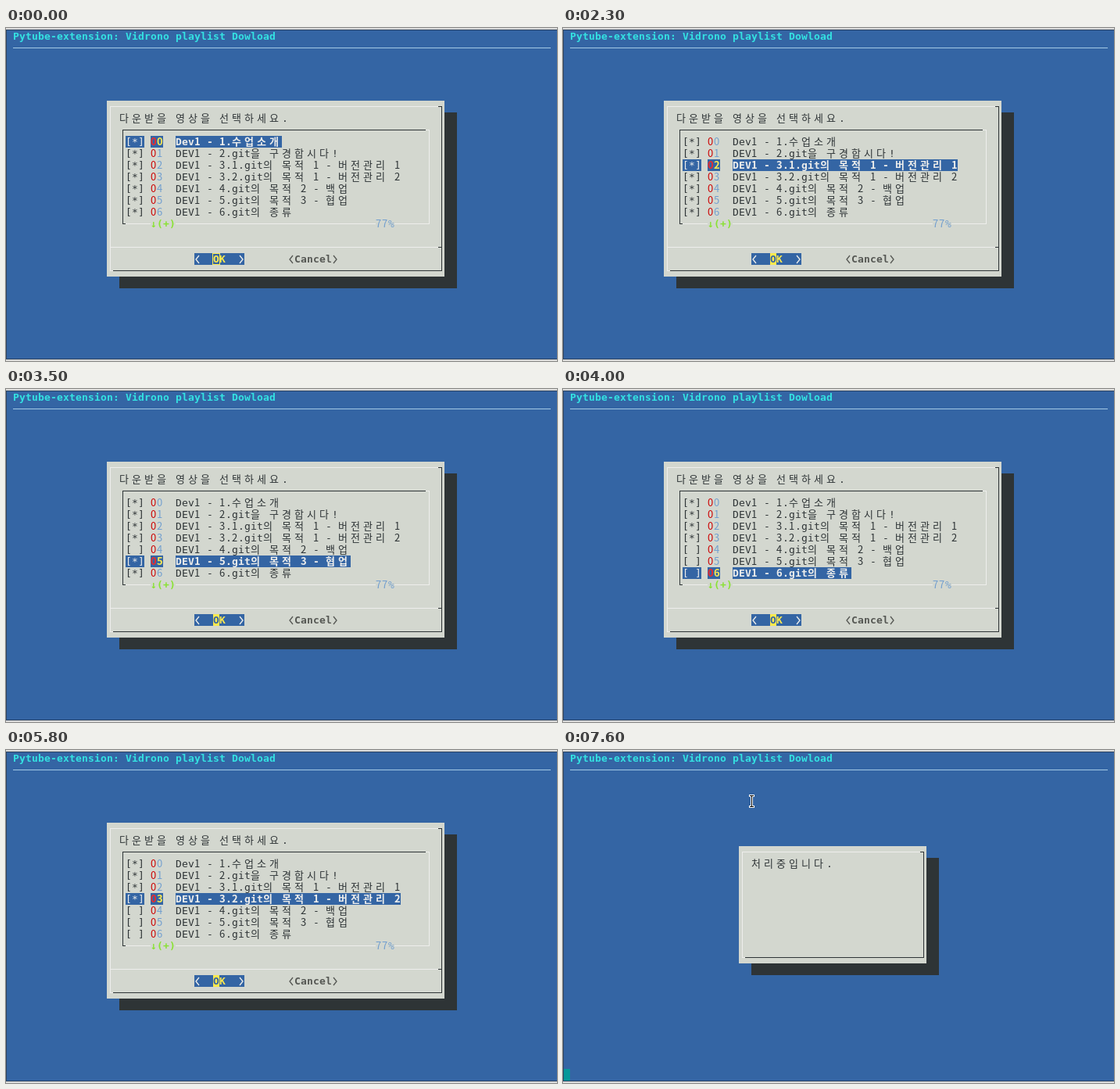
An HTML page with a canvas that plays this animation: 705x426 px, repeating every 8000 ms.

```html
<!DOCTYPE html>
<html lang="ko">
<head>
<meta charset="utf-8">
<title>Playlist dialog</title>
<style>
html, body { margin: 0; width: 100%; height: 100%; overflow: hidden; background: #3465a4; }
canvas { display: block; }
</style>
</head>
<body>
<canvas id="stage" width="705" height="426"></canvas>
<script>
const ctx = document.getElementById('stage').getContext('2d');
const LOOP = 8000, CW = 8, CH = 15;
const C = {
  blue: '#3465a4', dark: '#2e3436', grey: '#d3d7cf', light: '#eeeeec', cyan: '#34e2e2',
  yellow: '#fce94f', red: '#cc0000', brightRed: '#ef2929', sky: '#729fcf',
  green: '#8ae234', teal: '#06989a', dim: '#555753'
};
const LATIN = '"DejaVu Sans Mono", monospace';
const CJK = '"Noto Sans CJK KR", "Noto Sans CJK", sans-serif';

const items = [
  'Dev1 - 1.수업소개',
  'DEV1 - 2.git을 구경합시다!',
  'DEV1 - 3.1.git의 목적 1 - 버전관리 1',
  'DEV1 - 3.2.git의 목적 1 - 버전관리 2',
  'DEV1 - 4.git의 목적 2 - 백업',
  'DEV1 - 5.git의 목적 3 - 협업',
  'DEV1 - 6.git의 종류'
];

// Step tables: [time, value]
const selection = [[0, 0], [2100, 1], [2300, 2], [2800, 3], [3000, 4], [3500, 5],
  [3900, 6], [5500, 5], [5700, 4], [5800, 3]];
const unchecked = { 4: 3300, 5: 3700, 6: 4000 };
const caret = [[0, 'hollow'], [1100, 'block'], [1600, 'off'], [2100, 'block'],
  [4500, 'off'], [5200, 'block'], [7000, 'off'], [7600, 'block']];
const pointer = [[0, null], [500, [136, 0]], [600, [220, 51]], [1100, [238, 62]], [2100, null]];

const at = (steps, t) => steps.reduce((value, step) => t >= step[0] ? step[1] : value, null);
const px = col => 1 + col * CW;
const py = row => 3 + row * CH;
const isWide = ch => ch >= '가' && ch <= '힣';
const cells = text => [...text].reduce((n, ch) => n + (isWide(ch) ? 2 : 1), 0);

function box(x, y, w, h, color) {
  ctx.fillStyle = color;
  ctx.fillRect(x, y, w, h);
}

function fillCells(col, row, w, h, color) {
  box(px(col), py(row), w * CW, h * CH, color);
}

// Terminal text: each glyph starts at its own cell
function print(text, col, row, color, weight = 400) {
  ctx.fillStyle = color;
  for (const ch of text) {
    const family = isWide(ch) || /\d/.test(ch) ? CJK : LATIN;
    ctx.font = `${weight} 13px ${family}`;
    ctx.fillText(ch, px(col), py(row) + 12);
    col += isWide(ch) ? 2 : 1;
  }
}

function chevron(col, row, dir, color) {
  const x = px(col) + 4, y = py(row) + 8;
  ctx.strokeStyle = color;
  ctx.lineWidth = 1.3;
  ctx.beginPath();
  ctx.moveTo(x - 2 * dir, y - 5);
  ctx.lineTo(x + 2 * dir, y);
  ctx.lineTo(x - 2 * dir, y + 5);
  ctx.stroke();
}

// One-pixel bevel running through the centres of the edge cells
function bevel(col, row, w, h, topLeft, bottomRight) {
  const l = px(col) + 4, t = py(row) + 7;
  const r = px(col + w - 1) + 4, b = py(row + h - 1) + 7;
  box(l, t, r - l - 4, 1, topLeft);
  box(l, t, 1, b - t + 1, topLeft);
  box(l, b, 4, 1, topLeft);
  box(r - 4, t, 5, 1, bottomRight);
  box(r, t, 1, b - t + 1, bottomRight);
  box(l + 4, b, r - l - 3, 1, bottomRight);
}

function dialog(col, row, w, h) {
  fillCells(col + 2, row + 1, w, h, C.dark);
  fillCells(col, row, w, h, C.grey);
  bevel(col, row, w, h, C.light, C.dark);
}

function drawBackdrop() {
  box(0, 0, 705, 426, '#d9d9d9');
  box(0, 2, 705, 422, '#2b4260');
  box(1, 3, 704, 420, C.blue);
  print('Pytube-extension: Vidrono playlist Dowload', 1, 0, C.cyan, 700);
  box(9, 25, 688, 1, '#a3c9e6');
}

function drawItem(text, i, selected, checked) {
  const row = 9 + i;
  const weight = selected ? 700 : 400;
  const color = selected ? C.light : C.dark;
  if (selected) {
    fillCells(19, row, 3, 1, C.blue);
    fillCells(23, row, 2, 1, C.blue);
    fillCells(27, row, cells(text), 1, C.blue);
  }
  print(checked ? '[*]' : '[ ]', 19, row, color);
  print('0', 23, row, selected ? C.brightRed : C.red, weight);
  print(String(i), 24, row, selected ? C.yellow : C.sky, selected ? 700 : 500);
  print(text, 27, row, color, weight);
}

function drawButtons(mode) {
  fillCells(30, 19, 8, 1, C.blue);
  chevron(30, 19, -1, C.light);
  chevron(37, 19, 1, C.light);
  if (mode === 'block') fillCells(33, 19, 1, 1, C.yellow);
  print('O', 33, 19, mode === 'block' ? C.blue : C.yellow, 700);
  print('K', 34, 19, C.yellow, 700);
  if (mode === 'hollow') {
    ctx.strokeStyle = C.yellow;
    ctx.lineWidth = 1;
    ctx.strokeRect(264.5, 288.5, 9, 14);
  }
  chevron(45, 19, -1, C.dim);
  print('Cancel', 46, 19, C.dim, 700);
  chevron(52, 19, 1, C.dim);
}

function drawChecklist(t) {
  dialog(16, 6, 54, 15);
  print('다운받을 영상을 선택하세요.', 18, 7, C.dark);
  bevel(18, 8, 50, 9, C.dark, C.light);
  const current = at(selection, t);
  items.forEach((text, i) => drawItem(text, i, i === current, !(t >= unchecked[i])));

  fillCells(23, 16, 4, 1, C.grey);
  print('↓(+)', 23, 16, C.green, 700);
  fillCells(59, 16, 3, 1, C.grey);
  print('77%', 59, 16, C.sky, 500);

  box(133, 280, 420, 1, C.light);
  box(553, 280, 5, 1, C.dark);
  drawButtons(at(caret, t));
}

function drawProgress(t) {
  dialog(28, 8, 30, 10);
  print('처리중입니다.', 30, 9, C.dark);
  if (at(caret, t) === 'block') fillCells(0, 27, 1, 1, C.teal);
  box(238, 57, 7, 3, '#fff');
  box(238, 71, 7, 3, '#fff');
  box(240, 58, 3, 15, '#fff');
  box(239, 58, 5, 1, '#000');
  box(239, 72, 5, 1, '#000');
  box(241, 58, 1, 15, '#000');
}

function drawPointer([x, y]) {
  const outline = [[1, 1], [1, 16], [4.5, 13], [7, 18.5], [9.5, 17.5], [7, 12.3], [11.5, 12]];
  ctx.beginPath();
  outline.forEach(([dx, dy]) => ctx.lineTo(x + dx, y + dy));
  ctx.closePath();
  ctx.fillStyle = '#000';
  ctx.fill();
  ctx.strokeStyle = '#fff';
  ctx.lineWidth = 1;
  ctx.stroke();
}

function draw(t) {
  drawBackdrop();
  if (t < 6400) drawChecklist(t);
  else drawProgress(t);
  const tip = at(pointer, t);
  if (tip) drawPointer(tip);
}

const start = performance.now();
function tick() {
  draw((performance.now() - start) % LOOP);
  requestAnimationFrame(tick);
}
tick();
</script>
</body>
</html>
```
